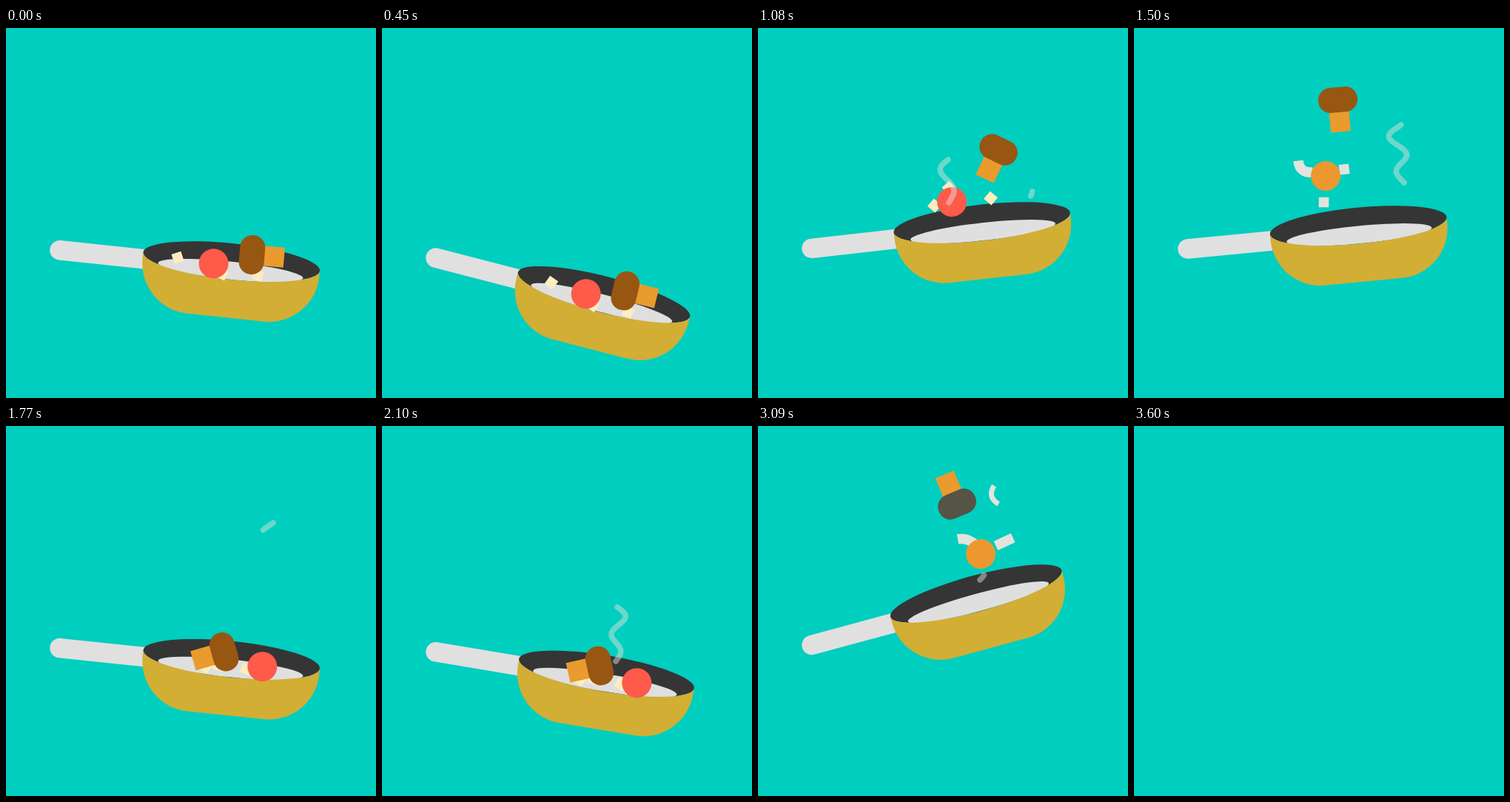
An HTML page for the animation above (3630 ms loop, 500 by 500 pixels).

```html
<!DOCTYPE html>
<html lang="en">
<head>
<meta charset="utf-8">
<title>Frying pan</title>
<style>
html, body { margin: 0; width: 100%; height: 100%; overflow: hidden; background: #00cebe; }
svg { display: block; width: 100vw; height: 100vh; }
</style>
</head>
<body>
<svg viewBox="0 0 500 500">
  <g id="scene">
    <g id="pan">
      <path d="M0 0H125" stroke="#e0e0e0" stroke-width="26.5" stroke-linecap="round"/>
      <ellipse cx="232.6" cy="-9" rx="120" ry="24.5" fill="#353535"/>
      <ellipse cx="232.6" cy="3.2" rx="98.5" ry="12" fill="#dfdfdf"/>
      <path d="M112.6 -9a120 24.5 0 0 0 240 0v8a68 68 0 0 1 -68 68h-104a68 68 0 0 1 -68 -68z" fill="#d2ae35"/>
    </g>
    <g id="bits" fill="none"></g>
    <g id="mushroom">
      <rect x="-13.5" width="27" height="43.5" fill="#e99b2d"/>
      <rect id="cap" x="-26.5" y="-17" width="53" height="34" rx="16.5"/>
    </g>
    <circle id="tomato" r="20"/>
    <g id="steam" fill="none" stroke="#e1e1dc" stroke-opacity=".48" stroke-width="7.5" stroke-linecap="round" stroke-linejoin="round"></g>
  </g>
</svg>
<script>
const LOOP = 3630, STEP = 30, END = 3600;
const TAU = 2 * Math.PI;
const $ = id => document.getElementById(id);
const clamp = v => Math.min(1, Math.max(0, v));
const phase = (t, from, to) => clamp((t - from) / (to - from));
const ease = (t, from, to) => (1 - Math.cos(Math.PI * phase(t, from, to))) / 2;
const lerp = (a, b, u) => a + (b - a) * u;
const mix = (a, b, u) => `rgb(${a.map((v, i) => Math.round(lerp(v, b[i], u)))})`;

function make(parent, attrs = {}) {
  const el = document.createElementNS("http://www.w3.org/2000/svg", "path");
  for (const k in attrs) el.setAttribute(k, attrs[k]);
  return parent.appendChild(el);
}

// Each swing dips, flicks up and comes back to rest; the food flies from launch to land
const swings = [
  { start: 0, dip: 620, flick: 795, end: 1785, launch: 915, land: 1740 },
  { start: 1785, dip: 2580, flick: 2674, end: 3570, launch: 2778, land: 3570 }
];
const FLICK = 445, LEAD = 60, PIVOT = 72.5;

function swingAt(t, rest, dip, flick) {
  const s = swings[t < swings[1].start ? 0 : 1], top = s.flick + FLICK;
  return rest + dip * ease(t, s.start, s.dip) - flick * ease(t, s.flick, top)
    + (flick - dip) * ease(t, top, s.end);
}
const tiltAt = t => swingAt(t, 6, 10.3, 31.8);
const liftAt = t => swingAt(t + LEAD, 300, 11.5, 15.5); // height runs ahead of the tilt

// Pose on the pan -> pose on the stage
function onPan([x, y, r], t) {
  const tilt = tiltAt(t), a = tilt * TAU / 360, c = Math.cos(a), s = Math.sin(a);
  return [PIVOT + x * c - y * s, liftAt(t) + x * s + y * c, r + tilt];
}

// Smooth polynomial through the points at the given times
function through(times, points, axis, t) {
  return points.reduce((sum, p, i) => sum + times.reduce(
    (w, tj, j) => i === j ? w : w * (t - tj) / (times[i] - tj), p[axis]), 0);
}

// left / right: resting poses before and after the first toss
// up: points passed in the air; spin: turn on the pan during each toss
const airTimes = [[1080, 1500], [3090]];
const mushroom = {
  left: [259.2, -21], right: [221.5, -18], angle: -91, spin: [159, 201], wobble: [60, 0],
  up: [[[325, 164.5], [275.5, 97]], [[269, 105.5]]]
};
const tomato = {
  left: [208.8, -3.8], right: [275, -3.5], angle: 0, spin: [0, 0],
  up: [[[262, 235], [259, 200]], [[301, 173]]]
};
const bits = [
  { left: [159.7, -6.7], right: [199, 5], angle: -24, roll: 54, spin: [0, -54], curl: [13, -7],
    up: [[[238.5, 240], [232, 187]], [[282, 157]]] },
  { left: [221.5, 9], right: [253.5, 2], angle: 20, spin: [90, 90], curl: [0, 0],
    up: [[[258, 216], [256.5, 235.5]], [[333, 156.5]]] },
  { left: [269.9, 6], right: [216, 1], angle: 12, spin: [90, -90], curl: [0, 13], thin: 6.5,
    up: [[[314.5, 230], [284, 191]], [[322, 93]]] }
];
bits.forEach(b => b.el = make($("bits")));

function poseAt(item, t) {
  const n = t < swings[0].land ? 0 : 1, { launch, land } = swings[n];
  const roll = (item.roll || 0) * ease(t, 0, swings[0].dip);
  const first = item.angle + roll + n * item.spin[0];
  const ends = n ? [item.right, item.left] : [item.left, item.right];
  const from = [...ends[0], first], to = [...ends[1], first + item.spin[n]];
  if (t <= launch) return onPan(from, t);
  if (t >= land) return onPan(to, t);

  const a = onPan(from, launch), b = onPan(to, land), u = phase(t, launch, land);
  const times = [launch, ...airTimes[n], land], points = [a, ...item.up[n], b];
  const wobble = item.wobble ? item.wobble[n] * (Math.sin(TAU * u) + Math.sin(TAU * u / 2) / 2) : 0;
  return [through(times, points, 0, t), through(times, points, 1, t), lerp(a[2], b[2], u) + wobble];
}

// Each wisp winds upwards, then its tail follows
const wisp = (x, y, lean, rise, waves, shift, start, span) => {
  const points = Array.from({ length: 41 }, (_, i) => {
    const u = i / 40, sway = (5 + 8 * u) * Math.sin(TAU * waves * (u - shift));
    return `${x + lean * u + sway} ${y - rise * u}`;
  });
  return { start, span, el: make($("steam"), { d: "M" + points.join("L"), pathLength: 1 }) };
};
const wisps = [
  wisp(258, 236, -1, 58, 1, 0, 700, 380),
  wisp(366, 227, -12, 96, 2, 0.455, 1060, 380),
  wisp(316, 318, 5, 96, 2, 0, 1820, 380),
  wisp(300, 208, 2, 72, 2, 0, 3070, 250)
];

const place = (el, [x, y, r]) => el.setAttribute("transform", `translate(${x} ${y}) rotate(${r})`);
const bump = (t, a, b, c, d) => ease(t, a, b) * (1 - ease(t, c, d));

function drawBit(bit, t, cooked) {
  const n = t < swings[0].land ? 0 : 1, bend = bit.curl[n] * cooked[n];
  const half = 6.75 + (n || bend ? 6 * cooked[n] : 0);
  place(bit.el, poseAt(bit, t));
  bit.el.setAttribute("d", `M${-half} 0Q0 ${bend} ${half} 0`);
  bit.el.setAttribute("stroke-width", 13.5 - (bit.thin || 0) * cooked[1]);
  bit.el.setAttribute("stroke", mix([253, 236, 192], [226, 227, 222], cooked[n]));
}

function draw(t) {
  $("scene").style.display = t >= END ? "none" : "";
  place($("pan"), [PIVOT, liftAt(t), tiltAt(t)]);

  const cooked = [bump(t, 1100, 1420, 1560, 1740), bump(t, 2800, 3090, 3250, 3560)];
  place($("mushroom"), poseAt(mushroom, t));
  $("cap").setAttribute("fill", mix([152, 86, 19], [86, 83, 71], cooked[1]));
  place($("tomato"), poseAt(tomato, t));
  $("tomato").setAttribute("fill", mix([255, 90, 74], [236, 152, 47], Math.max(...cooked)));
  bits.forEach(b => drawBit(b, t, cooked));

  for (const { start, span, el } of wisps) {
    const head = phase(t, start, start + span), tail = phase(t, start + span, start + 2 * span);
    el.style.display = head > tail ? "" : "none";
    el.setAttribute("stroke-dasharray", `${head - tail} 3`);
    el.setAttribute("stroke-dashoffset", -tail);
  }
}

const begin = performance.now();
function tick(now) {
  const t = Math.max(0, now - begin) % LOOP;
  draw(Math.floor(t / STEP) * STEP);
  requestAnimationFrame(tick);
}
draw(0);
requestAnimationFrame(tick);
</script>
</body>
</html>
```
